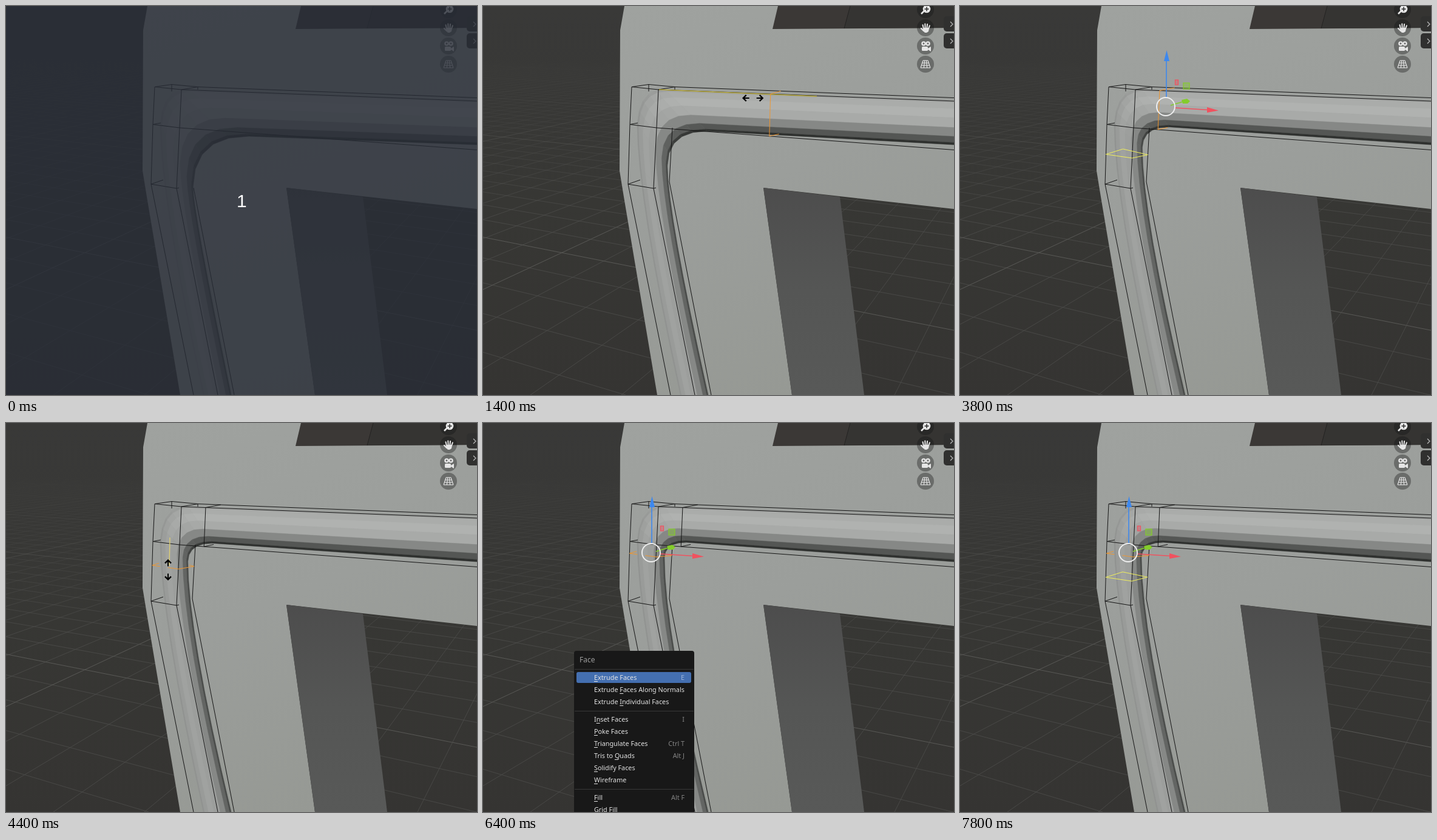
An HTML page with a canvas for the animation above (8000 ms loop, 776 px wide and 642 px high).

```html
<!DOCTYPE html>
<html lang="en">
<head>
<meta charset="utf-8">
<title>Loop cuts on a bevelled frame</title>
<style>
html, body { margin: 0; width: 100%; height: 100%; overflow: hidden; background: #373634; }
canvas { display: block; }
</style>
</head>
<body>
<canvas id="stage" width="776" height="642"></canvas>
<script>
const c = document.getElementById('stage').getContext('2d');
const W = 776, H = 642, LOOP = 8000, STEP = 200;
const INK = '#141414', ORANGE = '#f0962e', YELLOW = '#f2f05a', WHITE = '#e6e6e6';
const mix = (a, b, t) => a + (b - a) * t;
const mixPt = (a, b, t) => [mix(a[0], b[0], t), mix(a[1], b[1], t)];
const bend = (a, b, d, t) => mixPt(mixPt(a, b, t), mixPt(b, d, t), t);
const clamp = v => Math.min(1, Math.max(0, v));

// Points are flat lists: x, y, x, y, ...
function trace(p, close) {
  c.moveTo(p[0], p[1]);
  for (let i = 2; i < p.length; i += 2) c.lineTo(p[i], p[i + 1]);
  if (close) c.closePath();
}
function poly(fill, ...p) {
  c.beginPath(); trace(p, true);
  c.fillStyle = fill; c.fill();
}
function line(color, width, ...p) {
  c.beginPath(); trace(p);
  c.strokeStyle = color; c.lineWidth = width; c.stroke();
}
const wire = (color, ...pts) => line(color, 1, ...pts.flat());
function disc(x, y, r, fill) {
  c.beginPath(); c.arc(x, y, r, 0, 7);
  c.fillStyle = fill; c.fill();
}
function box(x, y, w, h, r, fill) {
  c.beginPath(); c.roundRect(x, y, w, h, r);
  c.fillStyle = fill; c.fill();
}
function fade(x0, y0, x1, y1, ...colors) {
  const g = c.createLinearGradient(x0, y0, x1, y1);
  colors.forEach((k, i) => g.addColorStop(i / (colors.length - 1), k));
  return g;
}

// Perspective grid: two vanishing points, even spacing along the bottom edge.
function drawFloor() {
  c.fillStyle = fade(0, 0, 0, H, '#393938', '#373734', '#353432');
  c.fillRect(0, 0, W, H);
  const minor = fade(0, 85, 0, 360, 'rgba(78,78,76,0)', 'rgba(78,78,76,.75)');
  const major = fade(0, 85, 0, 360, 'rgba(90,90,87,0)', 'rgba(90,90,87,.95)');
  for (let k = -60; k < 50; k++) {
    const color = k % 10 ? minor : major;
    line(color, 1, 1000, 0, -372 + 150 * k, H);
    line(color, 1, -1850, 15, 1315 + 270 * k, H);
  }
}

function drawBody() {
  poly(fade(250, 0, 500, H, '#9fa29f', '#9b9e9b', '#969994'),
    233, 0, 226, 40, 225, 272, 232, 315, 287, H, 509, H, 462, 300, W, 335, W, 0);
  poly(fade(0, 300, 0, H, '#4d4d4d', '#555655', '#585958'), 462, 300, 588, 315, 628, H, 509, H);
  poly('#3b3836', 486, 0, W, 0, W, 36, 477, 38);
  poly('#353432', 605, 0, W, 0, W, 36, 595, 37);
  line('#242322', 1, 605, 0, 595, 37);
}

// One rim of the tube: straight bar, rounded corner, curving post.
function rim(far, barEnd, corner, postTop, postBend, foot) {
  const pts = [far];
  for (let i = 0; i <= 5; i++) pts.push(bend(barEnd, corner, postTop, i / 5));
  for (let i = 1; i <= 8; i++) pts.push(bend(postTop, postBend, foot, i / 8));
  return pts;
}

// Light falls off from a highlight line across the half cylinder.
const barTone = f => 176 - 320 * Math.abs(f - .3) ** 2.3;
const postTone = f => 160 - 240 * Math.abs(f - .33) ** 2.3;
const BANDS = 7;

function drawTube(tight) {
  const outer = rim([W, 156], [300, 138], [258, 136], [254, 195], [254, 315], [325, H]);
  const inner = rim([W, 229],
    mixPt([400, 215], [335, 197], tight),
    mixPt([309, 214], [300, 197], tight),
    mixPt([308, 300], [299, 222], tight),
    mixPt([309, 342], [299, 345], tight), [371, H]);
  const across = k => (1 - Math.cos(Math.PI * k / BANDS)) / 2;
  for (let i = 1; i < outer.length; i++) {
    const turn = clamp((i - 1.5) / 5);
    for (let k = 0; k < BANDS; k++) {
      const a = across(k), b = across(k + 1), mid = (a + b) / 2;
      const g = Math.round(mix(barTone(mid), postTone(mid), turn));
      const fill = `rgb(${g},${g + 2},${g})`;
      poly(fill, ...mixPt(outer[i - 1], inner[i - 1], a), ...mixPt(outer[i], inner[i], a),
        ...mixPt(outer[i], inner[i], b), ...mixPt(outer[i - 1], inner[i - 1], b));
      c.strokeStyle = fill; c.lineWidth = .5; c.stroke();
    }
  }
}

// Cage edges: along the bar to the right side, and down the post (knee, then foot).
const bar = {
  front: [[289, 138], [W, 157]],
  back: [[316, 133.5], [W, 151.5]],
  low: [[286, 201], [W, 237.5]]
};
const post = {
  left: [[242, 195.5], [239, 294], [309, H]],
  front: [[286, 201], [281, 301], [349, H]],
  right: [[312, 201], [307, 290], [376, H]],
  back: [[271, 187], [266, 285]]
};
const along = (edge, t) => mixPt(edge[0], edge[1], t);

function drawCage(cut) {
  const tip = [245, 133.5], rear = [273, 129.5];
  wire(INK, bar.back[0], bar.front[0], tip, rear, ...bar.back);
  wire(INK, ...bar.front);
  wire(INK, ...bar.low);
  wire(INK, rear, [273, 141]);
  wire(INK, bar.back[0], [316, 138]);
  wire(INK, tip, ...post.left);
  wire(INK, bar.front[0], ...post.front);
  wire(INK, [255, 193], post.left[0], post.front[0]);
  wire(INK, [259, 287], post.left[1], post.front[1], [285, 300]);
  wire(INK, ...(cut ? post.right : [[309, 300], post.right[2]]));
}

// Cut across the bar, t along its edges.
function barCut(t, color) {
  const low = along(bar.low, t);
  wire(color, along(bar.back, t), along(bar.front, t), low, [low[0] + 16, low[1] - 3.5]);
}
// Cut around the post, t down its edges; partly hidden unless whole.
function postCut(t, color, whole) {
  const [l, f, r, b] = ['left', 'front', 'right', 'back'].map(k => along(post[k], t));
  if (whole) return wire(color, l, b, r, f, l);
  wire(color, mixPt(l, b, .4), l, mixPt(l, f, .3));
  wire(color, mixPt(l, f, .6), f, r, mixPt(r, b, .2));
}

function arrows(x, y, angle) {
  c.save();
  c.translate(x, y); c.rotate(angle);
  for (const d of [-1, 1]) {
    line('#000', 2, 6 * d, 0, 16 * d, 0);
    line('#000', 2.4, 11 * d, -5, 16 * d, 0, 11 * d, 5);
  }
  c.restore();
}

function gizmo(x, y) {
  const red = '#f0525f', green = '#84cc2c', blue = '#3d88ee';
  const frame = (color, x, y, w, h) => {
    c.globalAlpha = .4; box(x, y, w, h, 0, color);
    c.globalAlpha = 1;
    c.strokeStyle = color; c.lineWidth = 1.2; c.strokeRect(x, y, w, h);
  };
  c.save();
  c.translate(x, y);
  line(blue, 1.6, 1, -15, 1, -78);
  poly(blue, 1.5, -93, 6, -75, -3, -75);
  line(red, 1.6, 15, 2, 70, 5.5);
  poly(red, 87, 6.5, 68, 1, 68, 10);
  line(green, 1.6, 8, -2, 28, -8);
  poly(green, 40, -9, 35, -13, 26, -11, 28, -5, 36, -5);
  frame(green, 29, -39, 10, 10);
  frame(red, 15.5, -44, 5, 8);
  c.beginPath(); c.arc(0, 0, 15, 0, 7);
  c.strokeStyle = '#eee'; c.lineWidth = 2; c.stroke();
  c.restore();
}

function drawTools() {
  for (let y = 6; y < 100; y += 30) disc(729, y, 14, 'rgba(20,20,20,.36)');
  // zoom
  line(WHITE, 2.6, 727, 8, 722, 13);
  disc(731, 5, 6.3, WHITE);
  line('#333', 1.6, 727.5, 5, 734.5, 5);
  line('#333', 1.6, 731, 1.5, 731, 8.5);
  // hand
  c.lineCap = 'round';
  for (let i = 0; i < 4; i++)
    line(WHITE, 2, 726 + 2.6 * i, 38, 724.5 + 3.8 * i, 29.5 + (i - 1.3) ** 2);
  line(WHITE, 2.2, 726, 41, 722, 37);
  c.lineCap = 'butt';
  poly(WHITE, 725, 36, 735, 36, 734, 42, 731, 44, 728, 44, 725, 41);
  // camera
  for (const x of [726, 733]) {
    disc(x, 62, 3.8, WHITE);
    disc(x, 62, 1.4, '#666');
  }
  box(723, 67, 10, 7, 1.5, WHITE);
  poly(WHITE, 733, 70, 738, 67, 738, 75, 733, 72);
  // grid
  for (let i = 0; i < 4; i++) {
    const half = 4 + i * 4 / 3, y = 90 + 4 * i;
    line(WHITE, 1.1, 729 - half, y, 729 + half, y);
    line(WHITE, 1.1, 725 + i * 8 / 3, 90, 721 + i * 16 / 3, 102);
  }
  // side tabs
  for (const y of [17, 45]) {
    box(759, y, 24, 25, 5, '#30302f');
    line('#bbb', 1.2, 770, y + 9, 774, y + 13, 770, y + 17);
  }
}

// Underscore marks the access key, a bar separates the shortcut.
const menu = [
  ['_Extrude Faces|E', 'Extrude _Faces Along Normals', 'Extrude _Individual Faces'],
  ['I_nset Faces|I', '_Poke Faces', '_Triangulate Faces|Ctrl T', 'Tris to _Quads|Alt J',
    '_Solidify Faces', '_Wireframe'],
  ['_Fill|Alt F', '_Grid Fill']
];
function drawMenu() {
  const label = (text, x, y, color, align = 'left') => {
    c.textAlign = align; c.fillStyle = color; c.fillText(text, x, y);
  };
  box(150, 376, 198, 290, 4, '#181818');
  c.font = '12px "Noto Sans", sans-serif';
  label('Face', 159, 395, '#9c9c9c');
  box(154, 411, 189, 18, 3, '#446fb0');
  c.font = '10.8px "Noto Sans", sans-serif';
  let y = 424;
  for (const group of menu) {
    line('#383838', 1, 151, y - 17.5, 347, y - 17.5);
    for (const item of group) {
      const [text, key = ''] = item.split('|');
      const before = text.split('_')[0];
      label(text.replace('_', ''), 183, y, '#e4e4e4');
      c.fillRect(183 + c.measureText(before).width, y + 2, 6, 1);
      label(key, 332, y, y === 424 ? '#9ab2d8' : '#858585', 'right');
      y += 20;
    }
    y += 9;
  }
}

function draw(time) {
  const t = Math.floor(time / STEP) * STEP;
  const during = (a, b) => t >= a && t < b;
  const slide1 = 1 - (1 - clamp((t - 1200) / 1200)) ** 2;
  const slide2 = clamp((t - 4400) / 600);
  const barT = mix(.51, .082, slide1);
  const postT = mix(.4, .2, slide2);
  const mouse1 = along(bar.front, barT)[0] - 29;
  const mouse2 = along(post.left, postT)[1] + 7.5;

  drawFloor();
  drawBody();
  drawTube(t < 1200 ? 0 : t < 4400 ? mix(.3, .85, slide1) : mix(.92, 1, slide2));
  drawCage(t >= 1200);

  if (during(600, 1200)) barCut(.52, YELLOW);
  if (during(1200, 3000)) {
    line('#b3a436', 1.3, 290, 138, 550, 149);
    arrows(mouse1, 152, 0);
  }
  if (t >= 1200) barCut(barT, t < 4400 ? ORANGE : INK);
  if (during(3000, 4400)) gizmo(339, 166);

  if (during(3800, 4400)) postCut(.5, YELLOW, true);
  if (t >= 4400) postCut(postT, ORANGE);
  if (during(4400, 5400)) {
    line('#e0d070', 1.3, 270, 189, 269, mouse2 - 7);
    arrows(267, mouse2, Math.PI / 2);
  }
  if (t >= 5400) gizmo(277, 214);
  if (t >= 7800) postCut(.6, YELLOW, true);

  drawTools();
  if (during(6400, 6600)) drawMenu();
  if (t < 200) {
    c.fillStyle = 'rgba(39,44,54,.8)'; c.fillRect(0, 0, W, H);
    c.font = '30px "Liberation Sans", Arial, sans-serif';
    c.textAlign = 'left';
    c.fillStyle = '#fff'; c.fillText('1', 380, 332);
  }
}

const start = performance.now();
function tick() {
  draw((performance.now() - start) % LOOP);
  requestAnimationFrame(tick);
}
tick();
</script>
</body>
</html>
```
